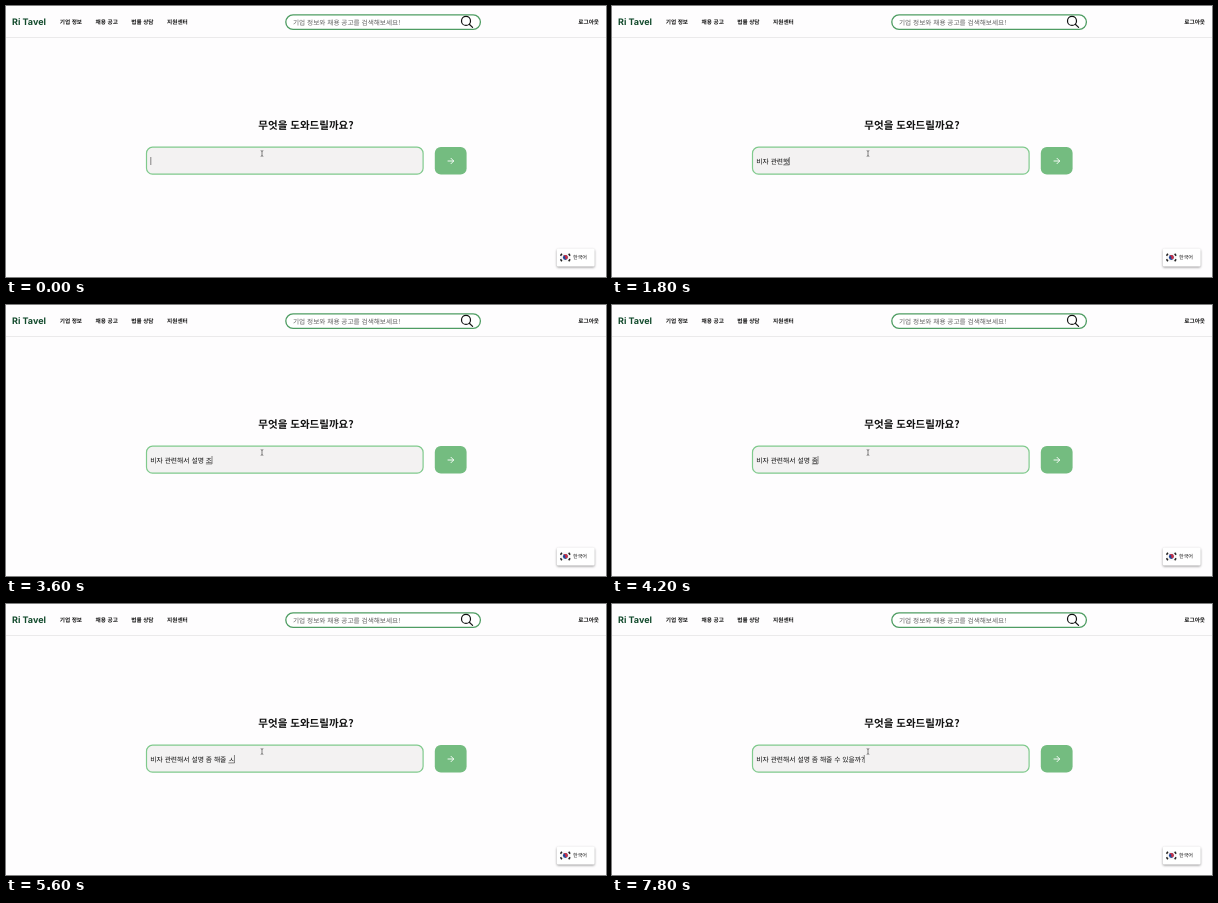
These frames come from a looping animation (600x271 px, 8000 ms). An HTML page:

```html
<!DOCTYPE html>
<html lang="ko">
<head>
<meta charset="utf-8">
<title>무엇을 도와드릴까요?</title>
<style>
  html, body { margin: 0; width: 100%; height: 100%; overflow: hidden; background: #fefdfe; }
  svg { display: block; width: 600px; height: 271px; }
  text { font-family: "Noto Sans CJK KR", "Noto Sans CJK", sans-serif; text-rendering: geometricPrecision; white-space: pre; fill: #111; }
  .brand { font: 700 9px Inter, sans-serif; fill: #124a2c; }
  .nav { font-size: 5.65px; font-weight: 700; }
  .hint { font-size: 6.65px; fill: #606060; }
  .title { font-size: 10.5px; font-weight: 700; text-anchor: middle; }
  .query { font-size: 6.78px; font-weight: 500; }
  .badge { filter: drop-shadow(0 1px 1px #0006); }
</style>
</head>
<body>
<svg viewBox="0 0 600 271">
  <path d="M0 31.5H600" stroke="#ebeaeb"/>
  <text class="brand" x="6" y="19.2">Ri Tavel</text>
  <g class="nav">
    <text class="nav" x="53.7" y="18.1">기업 정보</text>
    <text class="nav" x="89.6" y="18.1">채용 공고</text>
    <text class="nav" x="125.2" y="18.1">법률 상담</text>
    <text class="nav" x="161" y="18.1">지원센터</text>
    <text class="nav" x="572.3" y="18.1">로그아웃</text>
  </g>

  <rect x="279.8" y="8.8" width="194.6" height="14.6" rx="7.3" fill="#fff" stroke="#4f9d63" stroke-width="1.3"/>
  <text class="hint" x="287" y="18.5">기업 정보와 채용 공고를 검색해보세요!</text>
  <g fill="none" stroke="#111" stroke-width="1.2" stroke-linecap="round">
    <circle cx="460" cy="14.9" r="4.5"/>
    <path d="M463.3 18.2L466.6 21.4"/>
  </g>

  <text class="title" x="300" y="123">무엇을 도와드릴까요?</text>

  <rect x="140.5" y="141.2" width="276.6" height="27" rx="6" fill="#f3f2f2" stroke="#80ca8d" stroke-width="1.2"/>
  <text class="query" id="query" x="144.3" y="157.5"></text>
  <path id="underline" stroke="#333" stroke-width=".6"/>
  <path id="caret" stroke="#555" stroke-width=".7"/>

  <rect x="428.8" y="141" width="31.8" height="27.4" rx="6" fill="#74bc80"/>
  <path d="M442 155H447.6M445 152.3L447.7 155L445 157.7" fill="none" stroke="#fff" stroke-width=".9" stroke-linecap="round" stroke-linejoin="round"/>

  <path d="M254.7 144.6Q256 144.6 256 145.6Q256 144.6 257.3 144.6M256 145.4V149.6M254.7 150.4Q256 150.4 256 149.4Q256 150.4 257.3 150.4" fill="none" stroke="#555" stroke-width=".7"/>

  <rect class="badge" x="550.8" y="242.5" width="37.8" height="18" rx="1.5" fill="#fff"/>
  <g transform="translate(559.3 251.5)">
    <rect x="-5.3" y="-4" width="10.6" height="8" fill="#f6f6f6"/>
    <circle r="2.4" fill="#1f4796"/>
    <path d="M-2.4 0A2.4 2.4 0 0 1 2.4 0A1.2 1.2 0 0 1 0 0A1.2 1.2 0 0 0 -2.4 0" fill="#cf2f42" transform="rotate(25)"/>
    <path d="M-4.8 -1.8L-3.4 -3.7M4.8 -1.8L3.4 -3.7M-4.8 1.8L-3.4 3.7M4.8 1.8L3.4 3.7" stroke="#222" stroke-width="1.5"/>
  </g>
  <text x="567" y="253.4" font-size="5.1" font-weight="500">한국어</text>
</svg>
<script>
  const LOOP = 8000, LEFT = 144.3;
  // Start time in ms and the text typed by then.
  const steps = [
    [0, ""],
    [400, "ㅂ"], [600, "비"], [800, "비자"], [1000, "비자 "], [1200, "비자 고"], [1400, "비자 관"],
    [1600, "비자 관련"], [1800, "비자 관련햇"], [2000, "비자 관련해서"],
    [2400, "비자 관련해서 "], [2600, "비자 관련해서 ㅅ"], [2800, "비자 관련해서 서"],
    [3000, "비자 관련해서 설"], [3200, "비자 관련해서 설ㅁ"], [3400, "비자 관련해서 설명"],
    [3600, "비자 관련해서 설명 조"], [3800, "비자 관련해서 설명 좀"],
    [4600, "비자 관련해서 설명 좀 ㅎ"], [4800, "비자 관련해서 설명 좀 해"],
    [5000, "비자 관련해서 설명 좀 해주"], [5200, "비자 관련해서 설명 좀 해줄"],
    [5400, "비자 관련해서 설명 좀 해줄 "], [5600, "비자 관련해서 설명 좀 해줄 ㅅ"],
    [5800, "비자 관련해서 설명 좀 해줄 수"], [6000, "비자 관련해서 설명 좀 해줄 수 이"],
    [6200, "비자 관련해서 설명 좀 해줄 수 있"], [6400, "비자 관련해서 설명 좀 해줄 수 있을"],
    [6600, "비자 관련해서 설명 좀 해줄 수 있을ㄲ"], [6800, "비자 관련해서 설명 좀 해줄 수 있을까"],
    [7200, "비자 관련해서 설명 좀 해줄 수 있을까?"]
  ];
  const [query, underline, caret] = ["query", "underline", "caret"].map(id => document.getElementById(id));
  let shown = null;

  function show(text) {
    if (text === shown) return;
    shown = text;
    query.textContent = text;
    const end = LEFT + (text ? query.getComputedTextLength() : 0.5);
    const composing = /[ㄱ-ㅣ가-힣]$/.test(text);
    underline.setAttribute("d", composing ? `M${end - 6.1} 158.9H${end}` : "");
    caret.setAttribute("d", `M${end} 151V159`);
  }

  function frame() {
    const time = performance.now() % LOOP;
    show(steps.findLast(([start]) => start <= time)[1]);
    requestAnimationFrame(frame);
  }
  frame();
</script>
</body>
</html>
```
